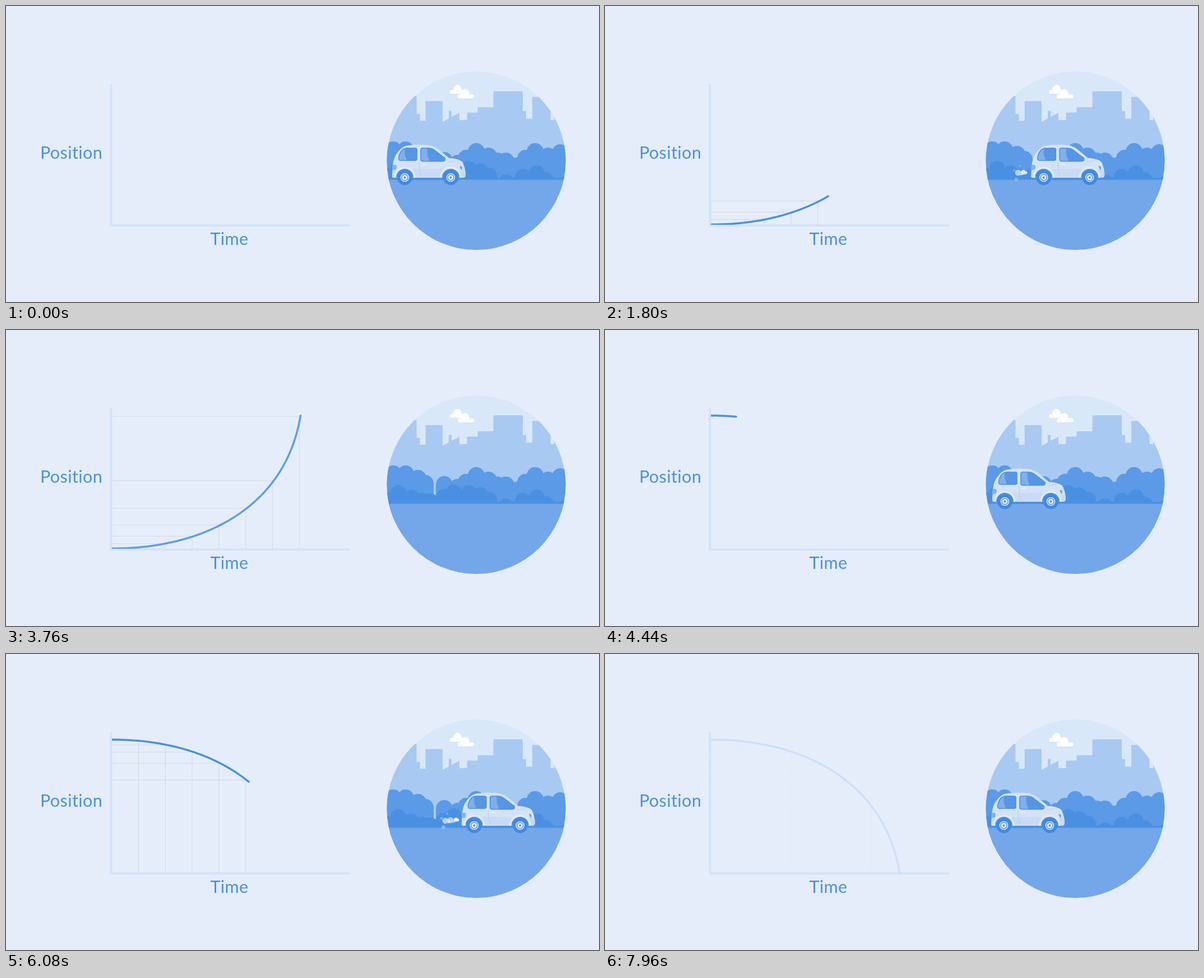
An HTML page that plays this animation: 1058x529 px, repeating every 8 s.

```html
<!DOCTYPE html>
<html lang="en">
<head>
<meta charset="utf-8">
<title>Position over time</title>
<style>
  html, body { margin: 0; height: 100%; overflow: hidden; background: #e5edfb; }
  svg { display: block; width: 100%; height: 100%; }
  text { font: 30.5px Lato, "Open Sans", sans-serif; letter-spacing: .4px; fill: #4a90e2; text-anchor: middle; }
</style>
</head>
<body>
<svg viewBox="0 0 1058 529">
  <defs>
    <clipPath id="disc"><circle cx="839" cy="276.5" r="159.5"/></clipPath>
    <clipPath id="plot"><rect x="189" y="130" width="440" height="261"/></clipPath>
    <clipPath id="glass">
      <path id="panes" d="M700.5 272Q701 266 704 261Q708 254 715 254H730Q733 254 733 257V273Q733 276 730 276H704Q700.500 276 700.500 272ZM740 257Q740 254 743 254H754Q760 254 764 257.500L783 272Q785 277.500 779 277.500H744Q740 277.500 740 274Z"/>
    </clipPath>
    <g id="wheel">
      <path d="M-19.500 0A19.500 19.500 0 0 1 19.500 0Z" fill="#e0eafa"/>
      <path d="M-15.500 0A15.500 15.500 0 0 1 15.500 0Z" fill="#4a90e2"/>
      <circle r="13.500" fill="#4389df"/>
      <circle r="7" fill="#4a90e2" stroke="#dce8f9" stroke-width="1.600"/>
      <circle r="4.800" fill="#e5edfb"/>
      <circle r="1.900" fill="#4a90e2"/>
    </g>
  </defs>

  <text x="116.500" y="273">Position</text>
  <text x="398.500" y="427">Time</text>
  <path d="M187.300 140V392.300H613.500" fill="none" stroke="#d2e3f7" stroke-width="4"/>
  <g id="graph" fill="none" clip-path="url(#plot)">
    <path id="grid" stroke="#d5d8dc"/>
    <polyline id="curve" stroke="#4a90e2" stroke-width="3.500" stroke-linecap="round" stroke-linejoin="round"/>
  </g>

  <g clip-path="url(#disc)">
    <path d="M679 117h320v320H679z" fill="#d8e8f9"/>
    <path fill="#a8c9f2" d="M670 161H732.500V193H738.500V205H748.500V170H779V207L790 201V187.500H795V198L809 191V204H822.500V190.500H841.500V181H869.500V152.500H922V188H928V201.500H939V162.500H971.500V204H978V190H1010V320H670Z"/>
    <g stroke="#fff" stroke-width="7" stroke-linecap="round">
      <path d="M795.500 153.500H814M809.500 161.500H832"/>
      <path d="M805.500 148.500h.01M819 156h.01" stroke-width="15"/>
    </g>
    <!-- Each bush is a round-topped column -->
    <g fill="none" stroke-linecap="round" stroke-linejoin="round">
      <path stroke="#5b9ae6" stroke-width="30" d="M691 257V310M713 257V310M735 265V310M748 274V310M782 276V310M806 281V310M821 272V310M839 260V310M861 268V310M877 277V310M892 277V310M911 286V310M927 272V310M944 260V310M967 268V310M989 262V310"/>
      <path stroke="#4a90e2" stroke-width="28" d="M682 304V330M700 291V330M723 299V330M742 305V330M757 306V330M781 298V330M799 290V330M826 291V330M846 295V330M862 303V330M892 315V330M922 305V330M947 299V330M963 311V330M1001 317V330"/>
    </g>
    <path d="M679 307h320v4H679z" fill="#4a90e2"/>
    <path d="M679 310.500h320v130H679z" fill="#73a7e9"/>
    <g id="puffs" fill="#fff"></g>
    <g id="car">
      <path d="M700 305H800V311H700Z" fill="#4a90e2"/>
      <path fill="#d3e2f7" d="M689 304L690 286Q691 275 694.500 268Q704 252 715 249.500Q735 246.500 757 249Q766 251 776 259.500L790 271.500Q811 273 815 280Q820 291 820 302Q820 306 816 307H692Q689 307 689 304Z"/>
      <path fill="#c8daf4" d="M690 294Q740 289 780 292L819 295Q820 299 820 302Q820 306 816 307H692Q689 307 689 304Z"/>
      <g clip-path="url(#glass)">
        <path d="M699 253h88v26h-88z" fill="#5796e4"/>
        <path d="M699 253H712Q709 266 717 278H699ZM739 253H752Q750 268 757 279H739Z" fill="#7fb0ec"/>
      </g>
      <use href="#panes" fill="none" stroke="#4a90e2" stroke-width="1.600"/>
      <path fill="none" stroke="#b5cef1" d="M737 279Q736.500 292 740 304M788 278.500Q797 278 802 276.500"/>
      <path stroke="#eff5fd" stroke-width="1.500" d="M741 282.800H749.500"/>
      <path fill="#86b2ed" d="M689.500 284H695Q697 284 697 287Q697 293 693 293H689Z"/>
      <path fill="#6ba3e9" d="M809.500 285.500L813.500 287V294Q810 291 809.500 285.500Z"/>
      <use href="#wheel" x="711.500" y="306.500"/>
      <use href="#wheel" x="793.500" y="306.500"/>
    </g>
  </g>
</svg>
<script>
const $ = id => document.getElementById(id);
const clamp = (v, a = 0, b = 1) => Math.min(b, Math.max(a, v));
const dot = (x, y, r, o = 1) => `<circle cx="${x}" cy="${y}" r="${r}" opacity="${o}"/>`;

// Bezier control values of both curves
const curveX = [189.5, 358, 499, 525.5];
const rise = [390.5, 390.5, 314, 153];
const fall = [153, 153, 231, 390.5];

function bezier([a, b, c, d], s) {
  const q = 1 - s;
  return a * q * q * q + 3 * b * s * q * q + 3 * c * s * s * q + d * s * s * s;
}

// Curve parameter at a given x
function paramAt(x) {
  let lo = 0, hi = 1;
  for (let i = 0; i < 20; i++) {
    const mid = (lo + hi) / 2;
    if (bezier(curveX, mid) < x) lo = mid; else hi = mid;
  }
  return hi;
}

function drawGraph(curveY, s) {
  const u = clamp(s / 2.88);
  const tip = 189.5 + 336 * (u + .3 * u * (1 - u) * (u - .68));
  const end = paramAt(tip);
  let points = '', lines = '';
  for (let i = 0; u && i <= 80; i++) {
    const k = end * i / 80;
    points += `${bezier(curveX, k).toFixed(2)},${bezier(curveY, k).toFixed(2)} `;
  }
  for (let x = 236.5; x < tip; x += 47.8) {
    const y = Math.floor(bezier(curveY, paramAt(x + 2))) + .5;
    lines += `M189 ${y}H${x}V391`;
  }
  $('curve').setAttribute('points', points);
  $('grid').setAttribute('d', lines);
  $('graph').setAttribute('opacity', clamp((4 - s) / .28));
}

function drawPuffs(s, rear) {
  let out = '';
  for (let i = 0; i < 3; i++) {
    const age = s - 1.02 - .46 * i;
    if (age <= 0 || s > 3.5) continue;
    const x = rear - 6 - 20 * age, y = 298 - i;
    const g = clamp(age * 8) * clamp(.6 + age, 0, 1.15);
    out += `<g opacity="${clamp(1.1 - age * .9, .6, 1)}">${dot(x - 1.5 * g, y, 4.6 * g) + dot(x + 3 * g, y + g, 3 * g)}</g>`;
  }
  // Small drops thrown off by the oldest puff
  const o = .35 * clamp((s - 1.6) / .3) * (s < 3.5);
  const x = rear - 6 - 20 * (s - 1.02);
  out += dot(x - 8.5, 293.5, 2.3, o) + dot(x + 2, 285.5, 1.6, o) + dot(x - 5, 309.5, 3.2, o);
  $('puffs').innerHTML = out;
}

function draw(now) {
  const t = now % 8000, s = t % 4000 / 1000;
  const back = s > 3.7;
  const dx = back ? 0 : 9.8 * s ** 2 + 2.09 * s ** 5;
  drawGraph(t < 4000 ? rise : fall, s);
  $('car').setAttribute('transform', `translate(${dx.toFixed(2)})`);
  $('car').setAttribute('opacity', back ? clamp((s - 3.76) / .2) : 1);
  drawPuffs(s, 689 + dx);
}

let start;
function frame(now) {
  start ??= now;
  draw(now - start);
  requestAnimationFrame(frame);
}
draw(0);
requestAnimationFrame(frame);
</script>
</body>
</html>
```
